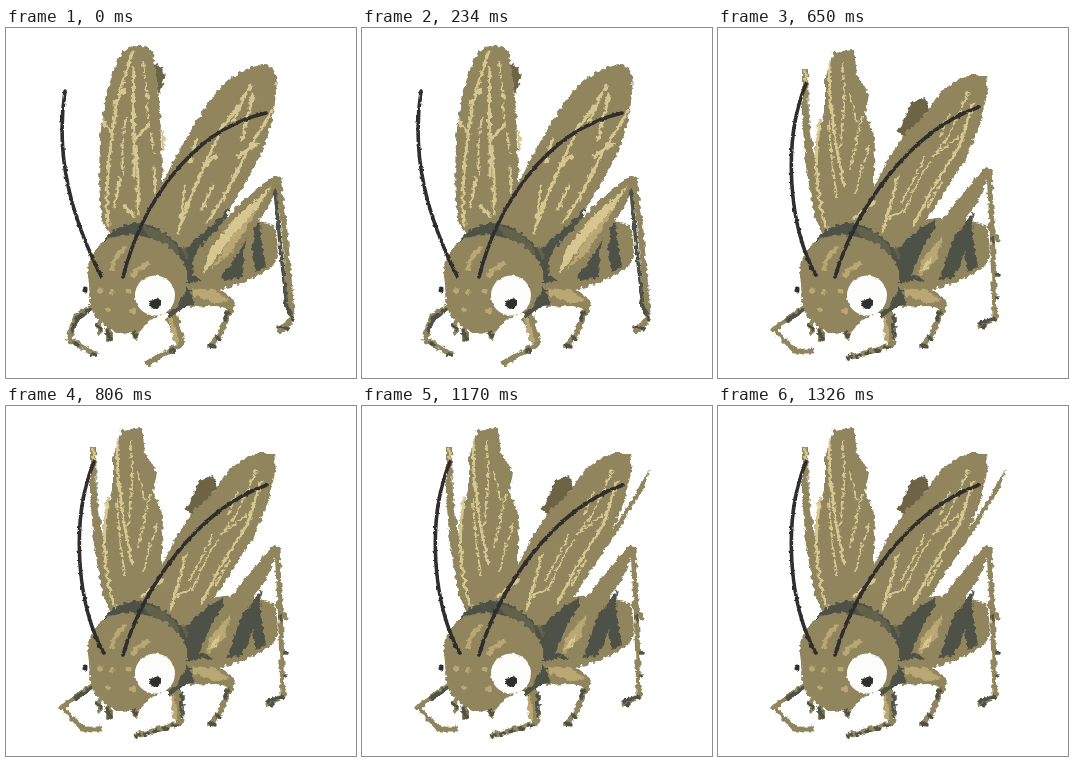
These frames come from a looping animation (350 px wide and 350 px high, 1.43 s). An HTML page:

```html
<!DOCTYPE html>
<html lang="en">
<head>
<meta charset="utf-8">
<title>Cricket</title>
<style>
  html, body { margin: 0; width: 100%; height: 100%; overflow: hidden; background: #fff; }
  svg { display: block; width: 100%; height: 100%; }
  path { fill: none; stroke-linecap: round; stroke-linejoin: round; }

  .olive { fill: #91855e; }
  .dark { fill: #4e5246; }
  .moss { fill: #62614a; }
  .tan { fill: #b9a873; }
  .brown { fill: #6d6345; }
  .pale { fill: #d5c78f; }
  .white { fill: #fdfdfb; }
  .ink { fill: #2d302c; }

  .vein { stroke: #d5c78f; stroke-width: 3; }
  .fine { stroke-width: 2.1; stroke-dasharray: 9 3 4 4; }
  .limb { stroke: #91855e; stroke-width: 6; }
  .shade { stroke: #4e5246; stroke-width: 3.5; }
  .glow { stroke: #b9a873; stroke-width: 6; }
  .dots { stroke-dasharray: 3 7; }
  .feeler { stroke: #302e2c; stroke-width: 3.6; }

  /* Poses: rest, then spread and fold twice over */
  .rest, .spread, .fold, .knee, .strip { animation: 1430ms step-end infinite; }
  .rest { animation-name: rest; }
  .spread { animation-name: spread; }
  .fold { animation-name: fold; }
  .knee { animation-name: knee; }
  .strip { animation-name: strip; }
  @keyframes rest {
    0% { visibility: visible; }
    27.2727%, 100% { visibility: hidden; }
  }
  @keyframes spread {
    0%, 45.4545%, 81.8182%, 100% { visibility: hidden; }
    27.2727%, 63.6364% { visibility: visible; }
  }
  @keyframes fold {
    0%, 27.2727%, 63.6364% { visibility: hidden; }
    45.4545%, 81.8182%, 100% { visibility: visible; }
  }
  @keyframes knee {
    0%, 81.8182%, 100% { visibility: hidden; }
    63.6364% { visibility: visible; }
  }
  @keyframes strip {
    0% { visibility: hidden; }
    81.8182%, 100% { visibility: visible; }
  }
</style>
</head>
<body>
<svg viewBox="0 0 350 350">
  <defs>
    <filter id="chalk" filterUnits="userSpaceOnUse" x="0" y="0" width="350" height="350" color-interpolation-filters="sRGB">
      <feTurbulence type="fractalNoise" baseFrequency=".22" numOctaves="2" seed="7"/>
      <feDisplacementMap in="SourceGraphic" scale="6" xChannelSelector="R" yChannelSelector="G"/>
    </filter>
    <filter id="pencil" filterUnits="userSpaceOnUse" x="0" y="0" width="350" height="350" color-interpolation-filters="sRGB">
      <feTurbulence type="fractalNoise" baseFrequency=".3" numOctaves="1" seed="3"/>
      <feDisplacementMap in="SourceGraphic" scale="3" xChannelSelector="R" yChannelSelector="G"/>
    </filter>
  </defs>

  <g filter="url(#chalk)">
    <!-- Wings -->
    <g class="rest">
      <path class="brown" d="M148 36L157 40 159 50 153 66Z"/>
      <path class="olive" d="M98 198C92 176 93 140 94 112C96 84 104 46 114 27Q121 17 134 18Q147 17 148 32C153 60 155 90 155 120L158 165L165 215L112 215Z"/>
      <path class="olive" d="M148 200L152 165C165 138 187 94 210 65Q234 37 260 37Q273 40 270 62C269 93 257 127 240 154C224 181 203 212 181 230L150 220Z"/>
      <path class="vein" d="M102 197C99 160 103 125 108 94C111 68 119 45 127 24M128 40C126 85 129 120 128 148M97 93L107 107M128 112L143 97M114 150Q111 168 108 178M118 178L128 188M130 118Q133 150 132 186M148 138L149 164M108 75L119 61"/>
      <path class="vein fine" d="M137 34Q142 70 142 94M120 91Q114 120 118 150M145 105L148 125"/>
      <path class="vein" d="M157 105L157 121M172 205C180 177 190 157 199 137L218 96M187 215C211 184 228 150 243 120L266 83M199 137L211 127M207 157L196 182M232 128L251 116M236 112L247 67M220 95L232 78M179 159L175 190M228 148L218 171M245 57Q236 70 228 93M190 112L184 134"/>
    </g>
    <g class="spread">
      <path class="tan" d="M61 35L67 38 73 72 81 80 78 92 84 122 93 160 109 194 106 207 96 201 82 165 70 112 64 72Z"/>
      <path class="pale" d="M72 78L81 79 78 88Z M79 120L86 138 98 172 94 174Z"/>
      <path class="olive" d="M108 204L104 172 106 120 110 82 107 52 114 24 136 22 139 46 151 65 148 88 157 109 158 144 154 190 135 212Z"/>
      <path class="olive" d="M135 205L155 164 171 131 188 106 211 80 217 57 236 61 250 47 266 48 269 63 254 100 232 139 206 177 176 224 150 220Z"/>
      <path class="tan" d="M176 226L204 192 228 154 258 104 269 97 266 124 242 152 214 186 187 226Z"/>
      <path class="glow" d="M266 99C270 80 288 75 297 85C300 99 284 122 268 137"/>
      <path class="vein" d="M109 192C107 150 107 116 114 68M171 218L205 176 259 92M137 190L157 171M163 186L183 151"/>
      <path class="vein fine" d="M125 44Q119 80 128 114L123 172M132 56Q130 84 136 104M143 92Q138 126 132 150M118 99L126 140M148 116L137 180M178 181Q195 141 223 110L248 69M170 174Q186 142 207 115M187 187Q211 151 236 124M225 84L215 109M201 135L193 166"/>
      <path class="vein fine" d="M194 78L195 89"/>
    </g>
    <g class="fold">
      <path class="olive" d="M84 42L90 41 91 91 98 139 111 193 106 211 96 185 88 139 84 89Z"/>
      <path class="brown" d="M180 104L193 74 207 69 211 81 191 112Z"/>
      <path class="olive" d="M111 205L101 164 97 117 107 84 107 52 115 24 136 22 139 46 151 67 147 87 157 109 156 143 156 171 138 212Z"/>
      <path class="olive" d="M132 207L154 164 170 131 186 107 207 87 222 64 238 53 252 47 268 47 270 63 262 97 248 130 228 162 194 214 166 225Z"/>
      <path class="vein" d="M87 44L88 54M107 199C96 150 97 127 102 92M111 35L112 72 118 116 126 158M165 203L180 148M190 208L213 163 242 117 255 76M136 190L157 174M172 190L184 183"/>
      <path class="vein fine" d="M124 35Q129 76 122 118M132 65L139 95M144 88L132 142M111 95Q113 133 119 169M151 119L137 165M187 183Q201 145 230 109L252 60M184 174Q196 151 207 129M224 154L209 180M232 86L222 108M217 127L242 108"/>
    </g>
    <path class="strip olive" d="M287 64L282 82 258 121 234 157 210 194 190 217 226 158 252 122 274 86Z"/>

    <!-- Abdomen -->
    <path class="olive" d="M166 218Q205 182 242 191L267 196Q277 225 266 239Q243 256 205 264L172 258Z"/>
    <path class="dark" d="M170 222L184 218 201 200 218 192 213 204 195 253 176 256Z M215 235L236 203 243 198 238 224 237 249 217 253Z M249 196L254 196 256 216 260 239 250 244 246 221Z"/>
    <path class="moss" d="M168 222L180 219 183 230 174 236Z"/>

    <!-- Hind leg -->
    <g class="rest">
      <path class="dark" d="M196 208L225 178 218 194 198 224Z"/>
      <path class="olive" d="M187 246Q183 227 202 211L235 174 269 147 276 151 263 177 240 212 222 240 205 257Z"/>
      <path class="pale" d="M197 247L204 221 232 187 267 157 251 181 225 211Z"/>
      <path class="tan" d="M204 242L229 205 253 180 225 225Z"/>
      <path class="limb" d="M272 153L278 197 286 291L274 303"/>
      <path class="shade" d="M269 162L274 215 281 280 288 293M272 299L283 301"/>
    </g>
    <g class="spread">
      <path class="dark" d="M180 239L206 198 236 162 256 144 221 196 196 247Z M226 244L250 196 260 156 264 150 256 180 246 214 240 242Z"/>
      <path class="olive" d="M193 249L204 219 231 180 262 137 268 143 253 175 235 222 212 259Z"/>
      <path class="tan" d="M200 246L207 222 231 183 262 139 245 181 222 225Z"/>
      <path class="pale" d="M209 225L230 186 256 148 234 199Z"/>
      <path class="limb" style="stroke-width:7" d="M266 143L275 194 286 288"/>
      <path class="limb" d="M286 288L275 301"/>
      <path class="shade" d="M264 146L267 187 277 247 284 288M290 291L289 292M274 300L280 300"/>
    </g>
    <circle class="knee pale" cx="263" cy="132" r="5"/>
    <g class="fold">
      <path class="dark" d="M189 249L196 218 214 197 223 200 206 254Z M222 241L246 196 256 183 252 205 240 243Z"/>
      <path class="olive" d="M193 247L208 213 240 171 268 138 273 143 261 171 235 211 219 256Z"/>
      <path class="tan" d="M200 249L205 229 225 209 219 231Z"/>
      <path class="pale" d="M203 244L207 234 214 229 210 240Z"/>
      <path class="limb" style="stroke-width:5" d="M271 143L274 197 277 290 262 298M272 199L280 212"/>
      <path class="shade" d="M274 211L275 215M279 246L280 247M279 270L280 270M262 295L277 291M264 299L267 298"/>
    </g>

    <!-- Right front leg -->
    <path class="olive" d="M177 258L211 260 229 273 228 282 211 278 179 279Z"/>
    <path class="tan" d="M185 260L208 262 223 272 209 275 188 267Z"/>
    <path class="dark" d="M177 258L185 262 188 276 177 281Z"/>
    <path class="limb" d="M225 279L216 302 207 317"/>
    <path class="shade" d="M222 284L218 292M211 309L213 311M204 318L209 319"/>

    <!-- Lower front legs -->
    <g class="rest">
      <path class="limb" d="M86 279L70 288 63 311 89 326M163 291L175 316 142 335"/>
      <path class="limb" d="M166 283L173 312" style="stroke-width:10"/>
      <path class="glow" style="stroke-width:4" d="M164 291L171 314"/>
      <path class="shade" d="M84 281L71 291 66 303M69 315L73 317M85 326L91 328M164 324L168 322"/>
    </g>
    <g class="spread">
      <path class="limb" style="stroke-width:8" d="M86 277L54 291M169 280L174 315"/>
      <path class="limb" style="stroke-width:5" d="M54 292L86 321M174 317L134 330"/>
      <path class="glow" style="stroke-width:4" d="M81 276L62 284M166 287L169 311"/>
      <path class="shade" d="M85 281L57 293M176 287L176 310M88 327L92 327"/>
      <path class="shade dots" d="M63 299L88 320M170 319L133 330"/>
    </g>
    <g class="fold">
      <path class="limb" style="stroke-width:5" d="M86 279L56 301 77 323 94 323M174 317L130 330"/>
      <path class="limb" style="stroke-width:9" d="M169 280L173 314"/>
      <path class="glow" style="stroke-width:4" d="M166 287L169 311"/>
      <path class="shade" d="M86 281L69 293M176 287L176 310M129 330L132 329"/>
      <path class="shade dots" d="M170 319L133 330"/>
    </g>

    <!-- Head -->
    <path class="dark" d="M92 222Q103 199 126 195Q155 194 174 220L183 237 177 280 164 291 134 230 95 230Z"/>
    <path class="moss" d="M132 196L156 203 172 219 174 228 158 222Z"/>
    <path class="olive" d="M80 254Q82 221 102 211Q125 203 150 212Q171 220 181 241Q183 263 170 280L145 292 132 305 113 306 99 298 87 285Z"/>
    <path class="limb" d="M93 295L94 304M103 297L103 311M127 299L130 309"/>
    <path class="shade" d="M91 297L95 301M101 302L104 311M128 304L130 309"/>
    <path class="glow" d="M106 241Q108 228 118 221M127 247Q132 239 142 236" style="stroke-width:5"/>
    <g class="tan">
      <circle cx="94" cy="263" r="3"/>
      <circle cx="106" cy="264" r="2.5"/>
      <circle cx="123" cy="263" r="2.5"/>
      <circle cx="102" cy="282" r="3"/>
      <circle cx="126" cy="283" r="3"/>
    </g>
  </g>

  <!-- Eyes and antennae -->
  <g filter="url(#pencil)">
    <path class="white" d="M81 244Q73 251 77 267L83 270Q84 255 81 244Z"/>
    <ellipse class="ink" cx="79" cy="262" rx="2.5" ry="3.5"/>
    <circle class="white" cx="149" cy="267.5" r="20"/>
    <path class="ink" d="M143 273L148 272 152 270 155 273Q156 281 148 281Q143 279 143 273Z"/>
    <g class="rest">
      <path class="feeler" d="M59 63C49 128 65 188 95 248M117 249C133 186 178 104 260 85"/>
    </g>
    <g class="spread">
      <path class="feeler" d="M125 56C93 122 78 202 98 247M117 249C136 185 190 102 259 71"/>
    </g>
    <g class="fold">
      <path class="feeler" d="M88 56C64 113 71 202 98 247M117 249C136 185 189 104 261 79"/>
    </g>
  </g>
</svg>
</body>
</html>
```
